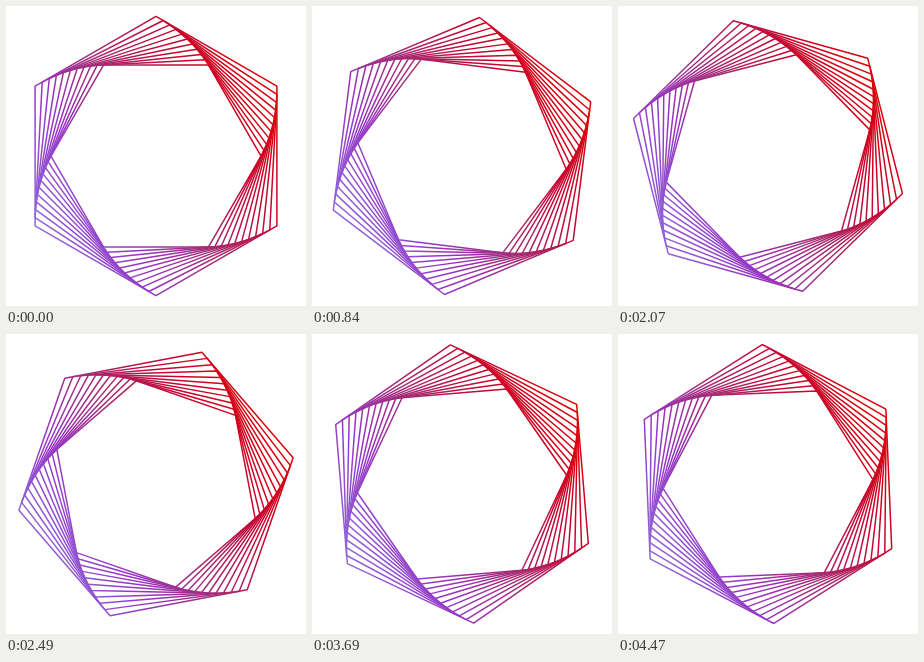
Recreate the animation shown at these times as an HTML page with a canvas. Size 300x300 px, loop 4500 ms.

```html
<!DOCTYPE html>
<html lang="en">
<head>
<meta charset="utf-8">
<title>Whirling hexagons</title>
<style>
  html, body { margin: 0; width: 100%; height: 100%; overflow: hidden; background: #fff; }
  canvas { display: block; }
</style>
</head>
<body>
<canvas id="stage" width="300" height="300"></canvas>
<script>
const ctx = document.getElementById('stage').getContext('2d');
const LOOP = 4500, STEP = 30, CENTER = 150, RADIUS = 139.6, RINGS = 11;
const rad = degrees => degrees * Math.PI / 180;
const TWIST = rad(3);
// Each hexagon's corners lie on the sides of the one around it.
const SHRINK = Math.cos(rad(30)) / Math.cos(rad(30) - TWIST);

// The colours stay fixed on the stage while the shape turns.
const gradient = ctx.createLinearGradient(29, 220, 271, 80);
['#8f68dc', '#9636c4', '#a52a70', '#c60530', '#e00000']
  .forEach((color, i, all) => gradient.addColorStop(i / (all.length - 1), color));
ctx.strokeStyle = gradient;
ctx.lineWidth = 1.5;
ctx.lineJoin = 'bevel';

function hexagon(radius, angle) {
  ctx.beginPath();
  for (let i = 0; i < 6; i++) {
    const a = angle + i * rad(60);
    ctx.lineTo(CENTER + radius * Math.sin(a), CENTER - radius * Math.cos(a));
  }
  ctx.closePath();
  ctx.stroke();
}

function draw() {
  const time = Math.floor(performance.now() % LOOP / STEP) * STEP;
  const turn = rad(360) * time / LOOP;
  ctx.clearRect(0, 0, 300, 300);
  for (let i = 0; i < RINGS; i++) hexagon(RADIUS * SHRINK ** i, turn + TWIST * i);
  requestAnimationFrame(draw);
}
draw();
</script>
</body>
</html>
```
